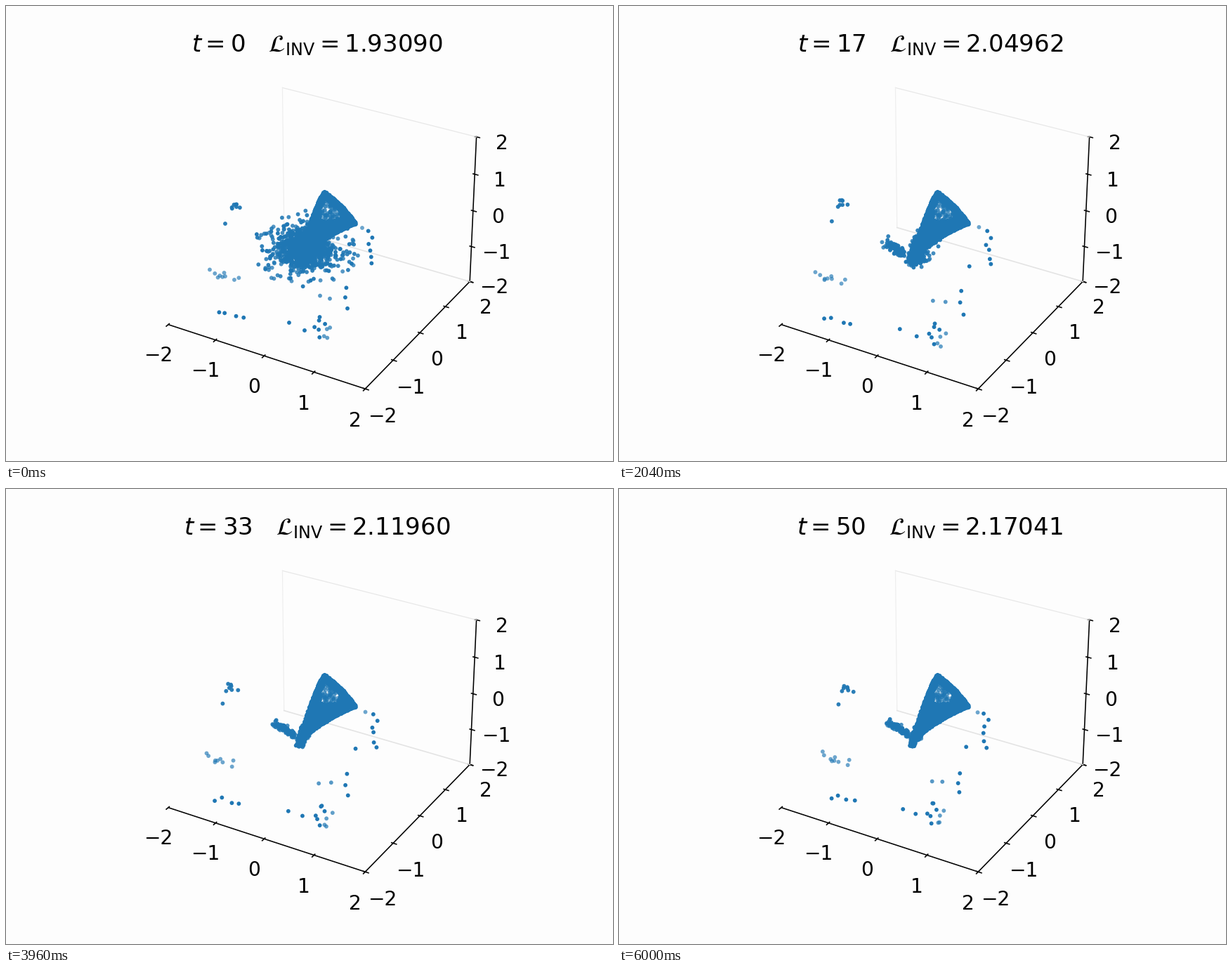
A matplotlib script that plays this animation: 864x648 px, repeating every 6120 ms.

```python
import numpy as np
import matplotlib.pyplot as plt
from matplotlib.animation import FuncAnimation
from matplotlib.colors import to_rgb
from matplotlib.path import Path

W, H, DPI = 864, 648, 144
FRAMES, STEP_MS = 51, 120
BACK, BLUE = "#fdfdfd", to_rgb("#1f77b4")
rng = np.random.default_rng(4)


def loss(t):
    return np.interp(t, [0, 7, 17, 28, 38, 46, 50],
                     [1.93090, 1.97516, 2.04962, 2.10527, 2.13393,
                      2.16511, 2.17041])


def segment(u, a, b, spread):
    """Points at fractions u of the way from a to b, scattered."""
    a, b = np.array(a, float), np.array(b, float)
    return a + np.outer(u, b - a) + rng.normal(0, spread, (len(u), 2))


def bezier(a, b, c, n):
    u = np.linspace(0, 1, n, endpoint=False)[:, None]
    a, b, c = map(np.array, (a, b, c))
    return (1 - u) ** 2 * a + 2 * u * (1 - u) * b + u ** 2 * c


def inside(poly, n):
    """n random points inside a polygon."""
    pts = rng.uniform(poly.min(0), poly.max(0), (n * 8, 2))
    return pts[Path(poly).contains_points(pts)][:n]


# ---- funnel: packed walls around a thinly covered mouth ----
PEAK, TIP, HUB = (453, 265), (498, 310), (417, 362)
outline = np.vstack([bezier(PEAK, (479, 282), TIP, 80),
                     bezier(TIP, (447, 331), HUB, 110),
                     bezier(HUB, (438, 287), PEAK, 110)])
rim = np.array([(455, 274), (479, 298), (474, 305), (447, 306), (448, 290)])

walls = inside(outline, 1600)
walls = walls[~Path(rim).contains_points(walls)]
walls = np.vstack([walls, outline + rng.normal(0, 0.4, outline.shape)])
mouth = inside(rim, 72)
mouth_phase = rng.uniform(0, 2 * np.pi, mouth.shape)


# ---- ball of points that settles on a branch, a foot and a neck ----
def disc(n, sx, sy):
    pts = rng.normal(0, 1, (n * 2, 2))
    pts = pts[np.hypot(*pts.T) < 2.2][:n]
    return pts * (sx, sy) + (426, 345)


ball = np.vstack([disc(700, 19, 15), disc(350, 35, 25)])
n_ball = len(ball)
ball_alpha = rng.uniform(0.75, 1, n_ball)
bx, by = (ball + rng.uniform(-8, 8, ball.shape)).T
branch = bx < 394
foot = ~branch & (by > 354)

u = rng.random(n_ball)
rest = segment(u, (421, 353), (441, 321), 3.2)
rest[branch] = segment(u, (382, 331), (413, 349), 2.2)[branch]
rest[foot] = segment(u, (417, 365), (421, 350), 1.6)[foot]
rate = np.where(branch, rng.uniform(7, 11, n_ball),
                rng.uniform(10, 16, n_ball))[:, None]


def settle(t):
    goal = rest.copy()
    goal[branch] += np.array((-10, 11)) * np.exp(-t / 18)
    return goal + (ball - goal) * np.exp(-t / rate)


# ---- outliers: short runs of (count, start, end, scatter, alpha) ----
RUNS = [
    (7, (325, 281), (328, 288), 3, 0.95),
    (1, (312, 310), (312, 310), 0, 0.95),
    (9, (291, 379), (328, 391), 4, 0.65),
    (4, (302, 434), (338, 446), 2, 1),
    (2, (403, 451), (425, 462), 0, 1),
    (6, (447, 439), (442, 475), 4, 1),
    (4, (456, 455), (456, 473), 4, 0.7),
    (2, (447, 412), (460, 417), 1, 0.75),
    (3, (484, 404), (484, 428), 2, 1),
    (1, (507, 316), (507, 316), 0, 0.65),
    (6, (516, 322), (520, 365), 2, 1),
    (1, (492, 367), (492, 367), 0, 1),
]
outer = np.vstack([segment(np.linspace(0, 1, n), a, b, s)
                   for n, a, b, s, _ in RUNS])
outer_alpha = np.repeat([run[4] for run in RUNS], [run[0] for run in RUNS])
outer_phase = rng.uniform(0, 2 * np.pi, outer.shape)
CENTRE = np.array((430, 340))


def wander(t):
    """Quick push away from the centre, slow return, slight sway."""
    push = min(t / 7, 1) * (0.1 - 0.08 * max(t - 7, 0) / 43)
    sway = 1.5 * (np.sin(0.3 * t + outer_phase) - np.sin(outer_phase))
    return CENTRE + (outer - CENTRE) * (1 + push) + sway


def positions(t):
    drift = 1.5 * np.sin(0.35 * t + mouth_phase)
    return np.vstack([mouth + drift, settle(t), walls, wander(t)])


alphas = np.concatenate([np.full(len(mouth), 0.62), ball_alpha,
                         np.ones(len(walls)), outer_alpha])
colors = np.c_[np.tile(BLUE, (len(alphas), 1)), alphas]


# ---- figure ----
fig = plt.figure(figsize=(W / DPI, H / DPI), dpi=DPI, facecolor=BACK)
box = fig.add_subplot(projection="3d", facecolor="none")
box.grid(False)
for axis in (box.xaxis, box.yaxis, box.zaxis):
    axis.set_pane_color((1, 1, 1, 0))
    axis.set_ticks(range(-2, 3))
box.tick_params(labelsize=14, pad=3)

# edges of the back pane
box.plot([-2, 2], [2, 2], [2, 2], color="#e7e7e7", lw=0.6)
box.plot([-2, -2], [2, 2], [-2, 2], color="#eeeeee", lw=0.6)
box.plot([-2, 2], [2, 2], [-2, -2], color="#e3e3e3", lw=0.8)
box.set(xlim=(-2, 2), ylim=(-2, 2), zlim=(-2, 2))
title = box.set_title("", fontsize=17)

layer = fig.add_axes([0, 0, 1, 1], facecolor="none")
layer.set(xlim=(0, W), ylim=(H, 0))
layer.axis("off")
dots = layer.scatter(*positions(0).T, s=8.5, c=colors, linewidths=0)


def draw(t):
    dots.set_offsets(positions(t))
    title.set_text(rf"$t = {t} \quad \mathcal{{L}}_{{\mathrm{{INV}}}}"
                   rf" = {loss(t):.5f}$")
    return dots, title


anim = FuncAnimation(fig, draw, frames=FRAMES, interval=STEP_MS,
                     repeat=True, repeat_delay=0, blit=False)
plt.show()
```
